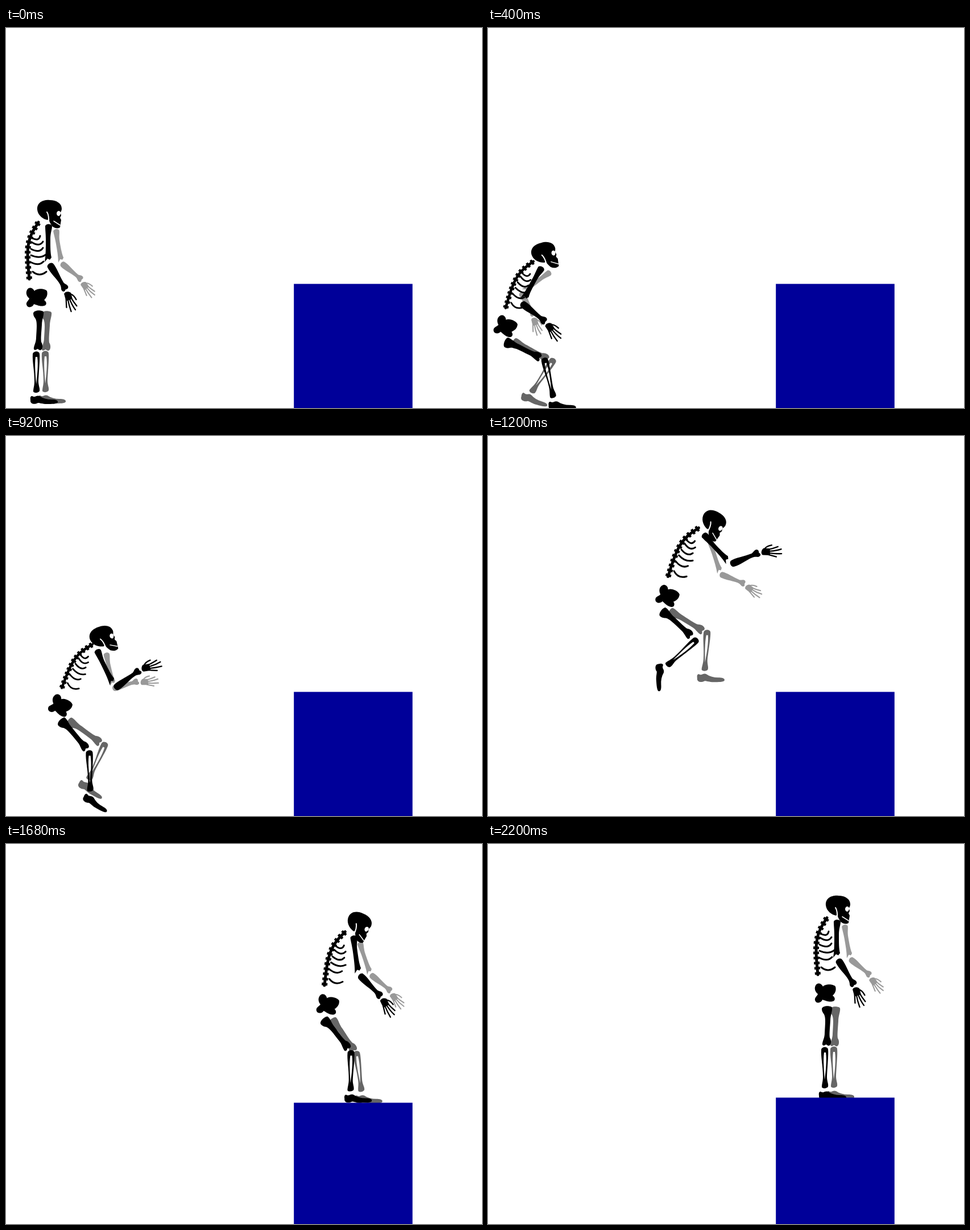
These frames come from a looping animation (837x669 px, 2.24 s). An HTML page:

```html
<!DOCTYPE html>
<html lang="en">
<head>
<meta charset="utf-8">
<title>Box jump</title>
<style>
  html, body { margin: 0; width: 100%; height: 100%; overflow: hidden; background: #fff; }
  svg { display: block; width: 837px; height: 669px; }
  .line { fill: none; stroke: #000; stroke-width: 3; stroke-linecap: round; }
  .cut { fill: none; stroke: #fff; stroke-width: 2; stroke-linecap: round; }
  .finger { fill: none; stroke: currentColor; stroke-width: 2.3; stroke-linecap: round; }
</style>
</head>
<body>
<svg viewBox="0 0 837 669">
  <defs>
    <path id="upper" d="M-5-2C-6-7 5-9 7-3C7 3 4 8 4 20C4 35 4 44 6 52L3 56L-1 54L-6 60C-4 48-4 35-4 20C-4 10-5 4-5-2Z"/>
    <path id="fore" d="M-6-1C-6-7 4-8 6-3C8 6 4 22 4 36C5 40 8 42 7 46C5 50 2 48 0 48C-3 51-7 49-6 44C-4 40-3 38-3 34C-3 22-7 10-6-1Z"/>
    <g id="hand">
      <path d="M-5 0C-3-4 4-3 7 1L7 12L-5 13Z"/>
      <path class="finger" d="M-4 10L-7 24M-1 10Q-2 22-1 33M2 10Q3 22 7 32M5 9Q7 17 11 26M6 3Q11 6 13 15"/>
    </g>
    <path id="thigh" d="M-9-1C-8-7 7-7 9-3C10 3 6 10 6 20C5 35 4 44 5 50C8 54 8 62 4 64C1 65 0 62-2 62C-5 65-9 64-8 60C-7 54-4 50-4 42C-3 25-2 15-5 9C-8 5-9 3-9-1Z"/>
    <path id="shin" fill-rule="evenodd" d="M-6-3C-5-9 6-9 6-3C7 5 5 25 4 45C4 53 7 57 6 62C4 66-4 66-5 63C-5 57-3 53-3 45C-3 25-7 10-6-3ZM-1 2C-3 15-1 35 0 50C2 35 4 15 2 2Z"/>
    <path id="foot" d="M-7 4C-8-3-5-4-2-2C2-1 4-5 9-3C15 1 22 3 30 3C36 3 42 4 41 8C40 11 30 11 22 11C14 11 10 9 6 9C2 12-8 12-7 4Z"/>
    <path id="pelvis" d="M-18-10C-16-19-7-18-4-11C0-16 14-16 18-11C20-4 17 1 13 5C18 8 18 14 13 15C6 17-1 13-5 12C-7 18-16 20-18 13C-19 8-14 6-13 2C-17-1-19-6-18-10Z"/>
    <path id="spine" fill="none" stroke="#000" d="M-13-32C-15-55-18-78-14-96C-11-112-3-122 3-132"/>
    <g id="torso">
      <use href="#spine" stroke-width="5" stroke-linecap="round"/>
      <use href="#spine" stroke-width="10" stroke-dasharray="4.5 4.5"/>
      <path class="line" d="M-8-104Q4-98 6-108M-9-97Q5-88 11-98M-10-85Q5-77 11-87M-10-74Q5-67 16-75M-11-62Q4-54 12-63M-7-45Q5-35 17-45"/>
    </g>
    <g id="skull">
      <g transform="translate(3 -11)">
        <path d="M-20 0C-21-14-8-18 2-17C14-17 23-11 23-2C23 2 21 3 21 6L22 10L20 14L22 18L21 24L20 31C15 34 10 32 6 29C3 24 1 21 0 16L-2 18C-9 17-19 10-20 0Z"/>
        <path fill="#fff" d="M14 6C15 1 20 1 21 5C21 9 19 11 17 11C15 10 14 9 14 6Z"/>
        <path class="cut" d="M-3 4Q1 10 0 24"/>
        <path class="cut" style="stroke-width:1.5" d="M9 20L20 27"/>
      </g>
    </g>
  </defs>
  <g id="rig"></g>
  <rect id="box" x="506.2" width="208.6" height="260" fill="#009"/>
</svg>
<script>
const LOOP = 2240, STEP = 40;
const ARM = '#999', LEG = '#666';

// Bones in drawing order: joint in the standing pose, rest angle of the shape.
// A bone with "follow" copies another bone's turn; "hang" keeps the hips level.
const bones = {
  pelvis: { shape: 'pelvis', joint: [54, 474] },
  farThigh: { shape: 'thigh', joint: [71, 504], parent: 'pelvis', hang: true, color: LEG },
  farShin: { shape: 'shin', joint: [69, 576], parent: 'farThigh', color: LEG },
  farFoot: { shape: 'foot', joint: [64, 650], parent: 'farShin', color: LEG },
  farUpper: { shape: 'upper', joint: [88, 360], parent: 'pelvis', rest: -10, size: .88, color: ARM },
  farFore: { shape: 'fore', joint: [101, 417], parent: 'farUpper', rest: -50, size: .86, color: ARM },
  farHand: { shape: 'hand', joint: [135, 450], parent: 'farFore', rest: -34, size: .88, color: ARM,
    follow: 'farFore', gain: 1 },
  torso: { shape: 'torso', joint: [54, 474], parent: 'pelvis', follow: 'pelvis', gain: 1 },
  nearThigh: { shape: 'thigh', joint: [57, 503], parent: 'pelvis', hang: true },
  nearShin: { shape: 'shin', joint: [53, 577], parent: 'nearThigh' },
  nearFoot: { shape: 'foot', joint: [50, 651], parent: 'nearShin' },
  nearUpper: { shape: 'upper', joint: [74, 352], parent: 'torso' },
  nearFore: { shape: 'fore', joint: [79, 420], parent: 'nearUpper', rest: -32 },
  nearHand: { shape: 'hand', joint: [107, 467], parent: 'nearFore', rest: -15,
    follow: 'nearFore', gain: .9 },
  skull: { shape: 'skull', joint: [72, 331], parent: 'torso' }
};

// Turns in degrees away from standing; "spine" stretches the torso, "hip" shifts the legs.
const stand = {};
const dip = { pelvis: 15, spine: -.04, skull: -11, nearUpper: 14, nearFore: -22, farUpper: 38, farFore: 5,
  nearThigh: -44, nearShin: -14, farThigh: -45, farShin: 17 };
const crouch = { pelvis: 30, spine: -.08, skull: -24, nearUpper: 47, nearFore: -16, farUpper: 94, farFore: 40,
  nearThigh: -94, nearShin: -11, farThigh: -89, farShin: 56, farFoot: 35 };
const push = { pelvis: 26, spine: -.08, skull: -22, nearUpper: -26, nearFore: -94, farUpper: -3, farFore: -56,
  nearThigh: -43, nearShin: -1, nearFoot: 29, farThigh: -57, farShin: 25, farFoot: 30 };
const fly = { pelvis: 23, skull: 27, nearUpper: -43, nearFore: -80, farUpper: -8, farFore: -18, hip: -10,
  nearThigh: -50, nearShin: 49, nearFoot: 86, farThigh: -61, farShin: 4 };
const trail = { ...fly, nearThigh: -10, nearFoot: 75 };
const settle = { pelvis: 12, skull: 21, nearUpper: -8, nearFore: -12, farUpper: -9, hip: -8,
  nearThigh: -41, nearShin: 1, farThigh: -37, farShin: -7 };
const land = Object.fromEntries(Object.entries(settle).map(([k, v]) => [k, v * 2]));

const linear = u => u;
const launch = u => u ** 3;
const rise = u => (5 * u - 2 * u * u) / 3;
const fall = u => u * u;
const slow = u => 1 - (1 - u) ** 2;
const smooth = u => u * u * (3 - 2 * u);

// Each beat is reached at its time; x and y place the pelvis.
const beats = [
  { at: 0, pose: stand, x: 54, y: 474 },
  { at: 240, pose: dip, x: 33, y: 501 },
  { at: 600, pose: crouch, x: 29, y: 556 },
  { at: 920, pose: push, x: 96, y: 475, ease: launch },
  { at: 1120, pose: trail, x: 251, y: 287, easeY: rise },
  { at: 1200, pose: fly, x: 316, y: 282, easeY: slow },
  { at: 1480, pose: land, x: 545, y: 380, easeY: fall },
  { at: 1680, pose: settle, x: 566, y: 283, ease: slow },
  { at: 2200, pose: stand, x: 593, y: 262, ease: smooth }
];
const boxBeats = [
  { at: 0, y: 450.5 },
  { at: 1400, y: 450.5 },
  { at: 1480, y: 498 },
  { at: 1680, y: 455.5 },
  { at: 2200, y: 446.5 }
];

const mix = (a = 0, b = 0, u) => a + (b - a) * u;

function span(list, t) {
  const i = Math.max(1, list.findIndex(beat => beat.at >= t));
  const from = list[i - 1], to = list[i];
  return { from, to, u: (t - from.at) / (to.at - from.at) };
}

// Where a joint sits once its parent has moved, turned and stretched.
function place(bone, hip) {
  const p = bones[bone.parent];
  const x = bone.joint[0] - p.joint[0], y = bone.joint[1] - p.joint[1];
  if (bone.hang) return [p.pos[0] + x + hip, p.pos[1] + y];
  const a = p.angle * Math.PI / 180;
  const c = Math.cos(a) * p.stretch, s = Math.sin(a) * p.stretch;
  return [p.pos[0] + x * c - y * s, p.pos[1] + x * s + y * c];
}

function draw(t) {
  const { from, to, u } = span(beats, t);
  const ease = to.ease || linear, easeY = to.easeY || ease;
  const value = key => mix(from.pose[key], to.pose[key], ease(u));
  const root = [mix(from.x, to.x, ease(u)), mix(from.y, to.y, easeY(u))];

  for (const [id, bone] of Object.entries(bones)) {
    bone.angle = bone.follow ? value(bone.follow) * bone.gain : value(id);
    bone.stretch = id === 'torso' ? 1 + value('spine') : 1;
    bone.pos = bone.parent ? place(bone, value('hip')) : root;
    bone.el.setAttribute('transform', `translate(${bone.pos}) rotate(${bone.angle + (bone.rest || 0)})`
      + ` scale(${bone.stretch * (bone.size || 1)})`);
  }

  const sink = span(boxBeats, t);
  box.setAttribute('y', mix(sink.from.y, sink.to.y, smooth(sink.u)));
}

const rig = document.getElementById('rig');
const box = document.getElementById('box');
for (const bone of Object.values(bones)) {
  bone.el = document.createElementNS('http://www.w3.org/2000/svg', 'use');
  bone.el.setAttribute('href', '#' + bone.shape);
  bone.el.setAttribute('fill', bone.color || '#000');
  bone.el.setAttribute('color', bone.color || '#000');
  rig.append(bone.el);
}

const start = performance.now();
function tick() {
  const t = Math.max(0, performance.now() - start) % LOOP;
  draw(Math.floor(t / STEP) * STEP);
  requestAnimationFrame(tick);
}
tick();
</script>
</body>
</html>
```
